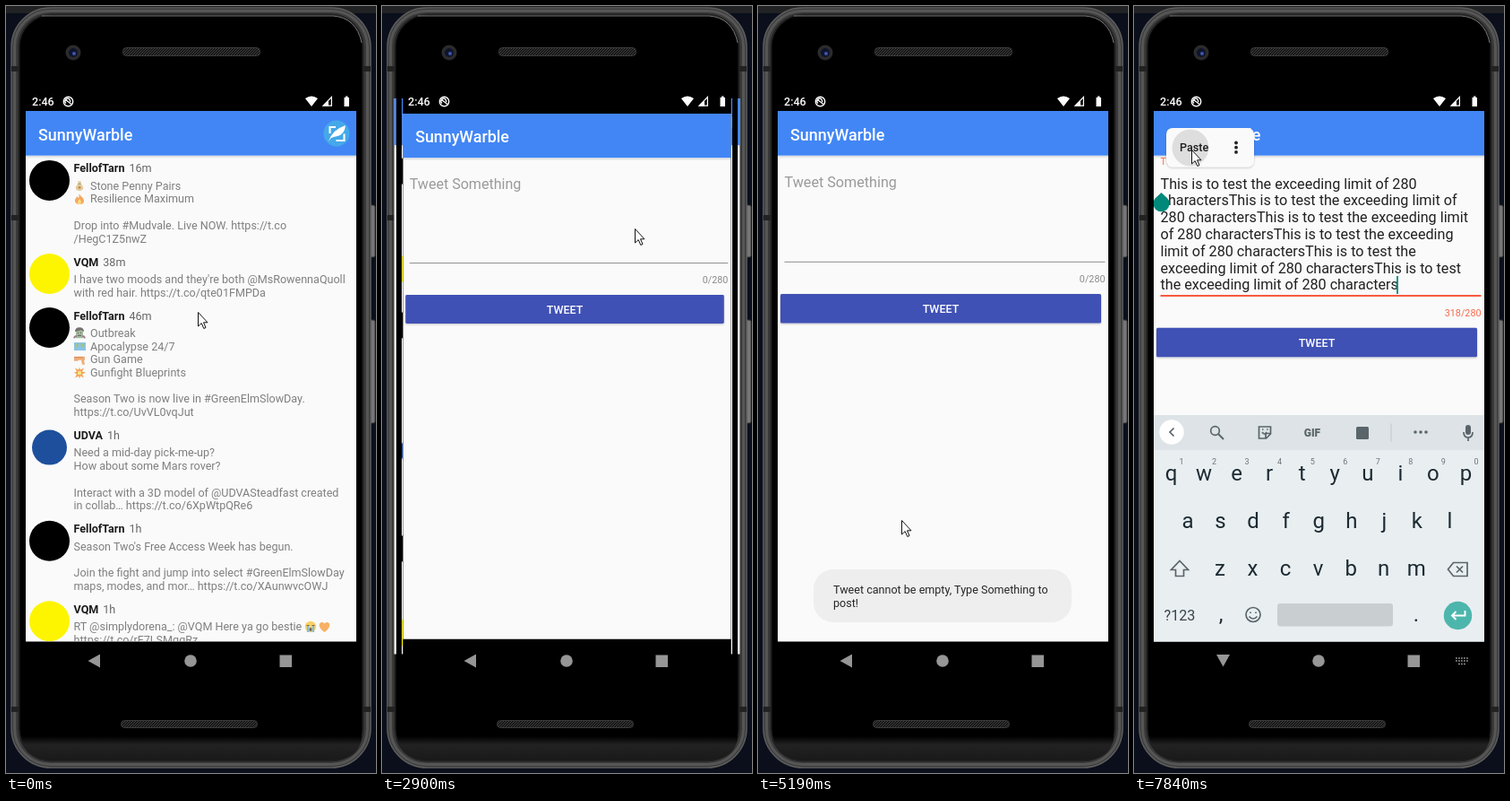
Write an HTML page that moves like this. It is 413 px wide and 855 px high and loops after 7.99 s.

```html
<!DOCTYPE html>
<html lang="en">
<head>
<meta charset="utf-8">
<title>Phone app demo</title>
<style>
  html, body { margin: 0; width: 100%; height: 100%; overflow: hidden; background: #0a0f1b; }
  svg { display: block; width: 100vw; height: 100vh; }
  text { font-family: Roboto, Arial, sans-serif; white-space: pre; }
  .title { font-size: 17.96px; font-weight: 500; fill: #fff; }
  .body { font-size: 12.57px; fill: #7f7f7f; }
  .name { font-size: 12.57px; font-weight: 700; fill: #1c1c1c; }
  .age { font-weight: 400; fill: #666; }
  .field { font-size: 16.16px; fill: #212121; }
  .count { font-size: 10.78px; text-anchor: end; }
  .caps { font-size: 12.57px; font-weight: 500; }
  .key { font-size: 24px; fill: #1c2b33; text-anchor: middle; }
  .num { font-size: 9px; fill: #6b757b; text-anchor: middle; }
  .mid { text-anchor: middle; }
  .ico { fill: none; stroke: #5a656b; stroke-width: 1.7; }
  #feed, #compose { transform-origin: 206.5px 413px; }
  #ripple { transform-origin: 168px 337px; }
  #press { transform-origin: 63px 158px; }
</style>
</head>
<body>
<svg viewBox="0 0 413 855" preserveAspectRatio="none">
  <defs>
    <linearGradient id="chin" x2="0" y2="1">
      <stop offset="0" stop-color="#000"/><stop offset=".35" stop-color="#222"/><stop offset="1" stop-color="#191919"/>
    </linearGradient>
    <linearGradient id="fall" x2="0" y2="1">
      <stop offset="0" stop-opacity=".14"/><stop offset="1" stop-opacity="0"/>
    </linearGradient>
    <pattern id="mesh" width="3" height="3" patternUnits="userSpaceOnUse">
      <rect width="3" height="3" fill="#161616"/><path d="M0 3L3 0" stroke="#4a4a4a" stroke-width=".8"/>
    </pattern>
    <filter id="soft" x="-10%" y="-20%" width="120%" height="150%">
      <feDropShadow dx="0" dy="1" stdDeviation="1" flood-opacity=".22"/>
    </filter>
    <clipPath id="page"><rect x="22" y="117" width="369" height="591.6"/></clipPath>

    <g id="bag"><path d="M4 1h4L7 4c5 3 4 8-1 8S0 7 5 4Z" fill="#e2c48f"/><path d="M4 4h4" stroke="#a57c48"/><circle cx="6" cy="8" r="1.5" fill="#a98042"/></g>
    <g id="fire"><path d="M6 0c0 3 5 4 5 8s-3 4-5 4-5-1-5-4 2-3 2-5l2 2C6 4 5 2 6 0Z" fill="#f49a45"/><path d="M6 6c2 2 3 6 0 6S4 8 6 6Z" fill="#fbd76c"/></g>
    <g id="ghoul"><path d="M2 12V3q4-5 8 0v9Z" fill="#93b08e"/><path d="M1 5q0-5 5-5t5 5L8 3 4 4Z" fill="#5f5a55"/><path d="M4 6h1M7 6h1M4 9h4" stroke="#444"/><path d="M0 12q1-3 3-2M12 12q-1-3-3-2" stroke="#8a6d7a" stroke-width="2" fill="none"/></g>
    <g id="map"><rect y="2" width="13" height="9" fill="#79b9e3"/><path d="M1 4l4-1-1 4-2 2ZM7 3l5 1-2 4-2-1Z" fill="#8dbb77"/></g>
    <g id="gun"><path d="M0 3h12v4H8l1 5h3L11 7H5L4 8H0Z" fill="#efa062"/><path d="M0 4h10" stroke="#c9774a"/></g>
    <g id="boom"><path d="M6 0l1 3 4-2-2 4 4 1-4 2 2 4-4-2-1 3-1-3-4 2 2-4-3-2 3-1-2-4 4 2Z" fill="#f2953e"/><circle cx="6" cy="6.5" r="2.2" fill="#fbdf70"/></g>
    <g id="sob"><circle cx="6.5" cy="6" r="6.2" fill="#fbc94e"/><path d="M3.5 5v7M9.5 5v7" stroke="#66b5ec" stroke-width="2.2"/><path d="M2 4.5h3M8 4.5h3" stroke="#664c20"/><ellipse cx="6.5" cy="9" rx="1.5" ry="2" fill="#664c20"/></g>
    <g id="heart"><path d="M6.5 12C-4 5 2-2 6.5 2.5 11-2 17 5 6.5 12Z" fill="#f6a54a"/></g>
  </defs>

  <!-- phone shell -->
  <rect width="413" height="855" fill="#0a0f1b"/>
  <rect width="413" height="8" fill="#212224"/>
  <g fill="#777" stroke="#333"><rect x="405" y="222" width="7" height="58" rx="2"/><rect x="405" y="350" width="7" height="115" rx="2"/></g>
  <rect x="6" y="2" width="401" height="847" rx="44" fill="#3a3a3a" stroke="#5c5c5c" stroke-width="1.5"/>
  <rect x="9.5" y="5.5" width="394" height="840" rx="40" fill="none" stroke="#565656" stroke-width="3"/>
  <rect x="14.5" y="9.500" width="384" height="832" rx="36" stroke="#222" stroke-width="2"/>
  <path d="M17 814H397q-2 27-34 27H52q-32 0-35-27Z" fill="url(#chin)"/>
  <path d="M40 11H365q26 2 32 30" fill="none" stroke="#777"/>
  <path d="M6 70h8M6 236h8M399 70h8M6 784h8M399 784h8" stroke="#222" stroke-width="6"/>
  <circle cx="75" cy="52" r="8.5" fill="#2b2b2d"/><circle cx="75" cy="52" r="5" fill="#10142a"/><circle cx="76" cy="53" r="2" fill="#3b55b5"/>
  <g fill="url(#mesh)" stroke="#3b3b3b"><rect x="130.5" y="46.5" width="153" height="9" rx="4"/><rect x="128.5" y="796.5" width="152" height="8" rx="4"/></g>

  <g id="feed">
    <g clip-path="url(#page)">
      <rect x="22" y="117" width="369" height="592" fill="#fafafa"/>
      <g id="posts"></g>
      <rect x="22" y="167" width="369" height="3" fill="url(#fall)"/>
      <rect x="22" y="117" width="369" height="49.700" fill="#4286f5"/>
      <text class="title" x="36" y="149.5">SunnyWarble</text>
      <circle cx="369" cy="142" r="14.5" fill="#45a8ea"/>
      <path d="M361.500 142v-7h6.500M377.500 142.500v7.500h-9" fill="none" stroke="#fff" stroke-width="2.1"/>
      <path d="M360 151q4-13 19-18-1 10-9 12-5 1-7 2Z" fill="#fff"/>
    </g>
  </g>
  <path d="M16 95h6v640h-6ZM391 95h6v640h-6Z"/>

  <g id="compose">
    <rect x="22" y="88" width="369" height="664"/>
    <g clip-path="url(#page)">
      <rect x="22" y="117" width="369" height="592" fill="#fafafa"/>
      <rect x="22" y="167" width="369" height="3" fill="url(#fall)"/>
      <rect x="22" y="117" width="369" height="49.700" fill="#4286f5"/>
      <text class="title" x="36" y="149.5">SunnyWarble</text>
      <text id="label" class="field">Tweet Something</text>
      <g id="typed"></g>
      <g id="lower">
        <path id="line" d="M29.5 285.3H387.5"/>
        <text id="zero" class="count" x="387.5" y="308" fill="#8a8a8a">0/280</text>
        <text id="over" class="count" x="387.5" y="308" fill="#f8694a">318/280</text>
        <rect x="25" y="321" width="358" height="32.5" rx="1.5" fill="#3f51b5" filter="url(#soft)"/>
        <rect id="ripple" x="39" y="321" width="323" height="32.5" rx="2" fill="#3a439b"/>
        <text class="caps mid" x="204" y="342.2" fill="#fff">TWEET</text>
      </g>
      <path id="caret" d="M30.3 186V208" stroke="#00897b" stroke-width="1.8"/>
      <path id="caretEnd" d="M294 301V321" stroke="#00897b" stroke-width="1.8"/>
      <path id="grip" d="M30.5 208L37 214a9 9 0 1 1-13 0Z" fill="#00897b"/>
      <g id="popup">
        <rect x="36" y="136" width="98" height="43.5" rx="7" fill="#fafafa" filter="url(#soft)"/>
        <circle id="press" cx="63" cy="158" r="20.5" fill="#dedede"/>
        <text class="caps" x="51" y="162" fill="#1c1c1c">Paste</text>
        <g fill="#222"><circle cx="114" cy="152.5" r="1.9"/><circle cx="114" cy="157.7" r="1.9"/><circle cx="114" cy="162.9" r="1.9"/></g>
      </g>
      <g id="keyboard">
        <rect x="22" y="456" width="369" height="253" fill="#e9eef1"/>
        <rect x="22" y="456" width="369" height="39" fill="#dde3e6"/>
        <circle cx="42" cy="475" r="13.7" fill="#fff"/>
        <g class="ico">
          <path d="M44.5 470.5L40 475l4.5 4.5"/>
          <circle cx="90.5" cy="473.5" r="4.8"/><path d="M94 477l6 6" stroke-width="2"/>
          <path d="M139.5 469h13v8l-5 5h-8ZM152 476.5h-5v5M143 475q3 4 5 0M143 472h1.5M148 472h1.5"/>
          <path d="M287 465.5v20" stroke="#c3c9cc" stroke-width="1"/>
          <path d="M368 475q0 6 5 6t5-6M373 481v4"/>
          <path d="M51 618.5l9.5 10h-5v7h-9v-7h-5Z"/>
          <path d="M356.5 620.5H372v15h-15.5l-6-7.5ZM360 624.5l7 7m0-7l-7 7"/>
          <circle cx="133" cy="678.5" r="8"/><path d="M128.5 680.5q4.5 5 9 0M130 675.5v1.5M136 675.5v1.5"/>
        </g>
        <g fill="#5a656b"><rect x="248" y="469" width="14" height="14" rx="1.5"/><rect x="370" y="467" width="6" height="11" rx="3"/>
          <circle cx="314" cy="475" r="1.8"/><circle cx="320" cy="475" r="1.8"/><circle cx="326" cy="475" r="1.8"/></g>
        <text x="199" y="479.5" class="mid" font-size="12" font-weight="900" fill="#5a656b">GIF</text>
        <g id="keys"></g>
        <text x="51" y="684.5" class="mid" font-size="16.2" fill="#37444b">?123</text>
        <rect x="160" y="666" width="129" height="25.5" rx="3" fill="#c9ced1"/>
        <circle cx="361.5" cy="679.5" r="15.7" fill="#4db6ac"/>
        <path d="M369.5 674v5.5H355m4.5-4.5l-4.5 4.5 4.5 4.5" fill="none" stroke="#fff" stroke-width="1.9"/>
      </g>
      <g id="toast">
        <rect x="62" y="628" width="288" height="59" rx="22" fill="#eee"/>
        <g class="body" style="fill:#262626"><text x="84" y="655.3">Tweet cannot be empty, Type Something to</text><text x="84" y="670.2">post!</text></g>
      </g>
    </g>
  </g>

  <!-- status and navigation bars -->
  <g fill="#fff">
    <text class="caps" x="29" y="111.3">2:46</text>
    <path d="M334 103q7-5 14 0l-7 9ZM377.5 102h1.5v-1.5h2.5V102h1.500v10h-5.500Z"/>
    <path d="M354 111.2L363.4 101.5V111.2Z" fill="none" stroke="#fff" stroke-width="1.2"/><path d="M354 111.5l6-6v6Z"/>
  </g>
  <circle cx="69.5" cy="106.5" r="5.2" fill="none" stroke="#fff" stroke-width="1.4"/>
  <path d="M66 104l7 5.5M67 108.5a3 3 0 0 1 4-4.5l1 3" fill="none" stroke="#fff" stroke-width="1.3"/>
  <g fill="#969696">
    <path id="back" d="M91.5 730L105 722.5v15Z"/>
    <path id="down" d="M92 723h15L99.5 736.5Z"/>
    <circle cx="206" cy="730" r="6.8"/><rect x="305.5" y="723.5" width="13.5" height="13.5"/>
    <path id="board" d="M359 727h14M359 730h14M362 733.5h8" fill="none" stroke="#969696" stroke-width="1.7" stroke-dasharray="1.8 1.2"/>
  </g>
  <path id="cursor" d="M.5.5V16L4.2 12.6 6.8 18.5 9 17.5 6.500 11.800H11Z" fill="#fff" stroke="#111"/>
</svg>

<script>
const LOOP = 7990;
const $ = id => document.getElementById(id);

function add(parent, tag, attrs, text) {
  const el = document.createElementNS('http://www.w3.org/2000/svg', tag);
  for (const k in attrs) el.setAttribute(k, attrs[k]);
  if (text) el.textContent = text;
  $(parent)?.append(el);
  return el;
}

// [name, age, avatar colour, avatar radius, lines]; a line may open with ~emoji
const posts = [
  ['FellofTarn', '16m', '#000', 22.5, '~bag Stone Penny Pairs|~fire Resilience Maximum||Drop into #Mudvale. Live NOW. https://t.co|/HegC1Z5nwZ'],
  ['VQM', '38m', '#fdf500', 22.5, "I have two moods and they're both @MsRowennaQuoll|with red hair. https://t.co/qte01FMPDa"],
  ['FellofTarn', '46m', '#000', 22.5, '~ghoul Outbreak|~map Apocalypse 24/7|~gun Gun Game|~boom Gunfight Blueprints||Season Two is now live in #GreenElmSlowDay.|https://t.co/UvVL0vqJut'],
  ['UDVA', '1h', '#1d4f9c', 19.5, 'Need a mid-day pick-me-up?|How about some Mars rover?||Interact with a 3D model of @UDVASteadfast created|in collab… https://t.co/6XpWtpQRe6'],
  ['FellofTarn', '1h', '#000', 22.5, "Season Two's Free Access Week has begun.||Join the fight and jump into select #GreenElmSlowDay|maps, modes, and mor… https://t.co/XAunwvcOWJ"],
  ['VQM', '1h', '#fdf500', 22.5, 'RT @simplydorena_: @VQM Here ya go bestie |https://t.co/rF7LSMqqRz']
];
let y = 185.4;
for (const [name, age, fill, r, copy] of posts) {
  add('posts', 'circle', { cx: 48.5, cy: y + 9, r, fill });
  const head = add('posts', 'text', { x: 75.5, y, class: 'name' }, name);
  head.append(add('', 'tspan', { dx: 5, class: 'age' }, age));
  const lines = copy.split('|');
  lines.forEach((line, i) => {
    const by = y + 19.3 + i * 14.73;
    const [, emoji, rest] = line.match(/^(?:~(\w+) )?(.*)$/);
    if (emoji) add('posts', 'use', { href: '#' + emoji, x: 76, y: by - 10.5, opacity: .85 });
    add('posts', 'text', { x: emoji ? 94 : 75.5, y: by, class: 'body' }, rest);
  });
  y += 30.5 + 14.73 * lines.length;
}
add('posts', 'use', { href: '#sob', x: 333.5, y: 686, opacity: .85 });
add('posts', 'use', { href: '#heart', x: 349, y: 686, opacity: .85 });

['This is to test the exceeding limit of 280',
 'charactersThis is to test the exceeding limit of',
 '280 charactersThis is to test the exceeding limit',
 'of 280 charactersThis is to test the exceeding',
 'limit of 280 charactersThis is to test the',
 'exceeding limit of 280 charactersThis is to test',
 'the exceeding limit of 280 characters'
].forEach((s, i) => add('typed', 'text', { x: 29.5, y: 203.5 + i * 18.8, class: 'field' }, s));

[['qwertyuiop', 41.5, 529], ['asdfghjkl', 60, 581.5], ['zxcvbnm', 96, 635]].forEach(([row, x, ky]) =>
  [...row].forEach((c, i) => {
    add('keys', 'text', { x: x + i * 36.55, y: ky, class: 'key' }, c);
    if (ky < 550) add('keys', 'text', { x: 53 + i * 36.55, y: 511, class: 'num' }, String((i + 1) % 10));
  }));
add('keys', 'text', { x: 97, y: 686, class: 'key' }, ',');
add('keys', 'text', { x: 315, y: 686, class: 'key' }, '.');

// Each track holds a value until its next listed time.
const tracks = [];
const hold = (id, prop, steps) => tracks.push({ style: $(id).style, prop, steps });
const fade = (id, ...steps) => hold(id, 'opacity', [[0, 0], ...steps]);
const at = (x, y, s = 1) => `translate(${x}px, ${y}px) scale(${s})`;

hold('cursor', 'transform', [
  [0, 214, 341], [530, 243, 250], [650, 205, 150], [780, 120, 105], [900, 42, 112], [1020, 50, 175],
  [1140, 116, 198], [1290, 193, 198], [1440, 250, 228], [1560, 310, 205], [1690, 345, 160],
  [1810, 359, 150], [1950, 378, 150], [2090, 382, 146], [2220, 374, 140], [2340, 370, 139],
  [2780, 330, 185], [2900, 282, 248], [3020, 245, 300], [3170, 222, 325], [3290, 208, 330],
  [3410, 200, 325], [3530, 198, 322], [3680, 195, 335], [3810, 194, 344], [3950, 194, 346],
  [4440, 200, 400], [4560, 207, 480], [4680, 211, 560], [4800, 213, 640], [4920, 210, 688],
  [5060, 112, 640], [5190, 160, 573], [5340, 150, 360], [5460, 138, 160], [5580, 128, 88],
  [5700, 128, 170], [5820, 130, 206], [6230, 110, 212], [6350, 70, 214], [6470, 42, 214],
  [6590, 32, 212], [7360, 44, 196], [7480, 58, 172], [7600, 64, 160]
].map(([t, x, y]) => [t, at(x, y)]));

hold('feed', 'transform', [[0, 'none'], [2780, 'scale(1.025)'], [2900, 'scale(1.047)'], [3020, 'none']]);
hold('compose', 'transform', [[0, 'scale(.95)'], [2900, 'scale(.993, .99)'], [3020, 'none']]);
fade('compose', [2780, .8], [2900, 1]);

fade('ripple', [4200, 1], [4440, .5], [4560, 0]);
hold('ripple', 'transform', [[0, 'none'], [4320, 'scaleX(1.1084)']]);
fade('toast', [4320, .3], [4440, .75], [4560, 1], [6110, .93], [6230, .4], [6350, 0]);

hold('label', 'transform', [[0, at(29.5, 201.5)], [5820, at(29.5, 193, .86)], [5970, at(29.5, 180, .71)], [6110, at(29.5, 177, .667)]]);
hold('label', 'fill', [[0, '#9a9a9a'], [5820, '#00897b'], [7840, '#f8694a']]);
hold('line', 'stroke', [[0, '#8c8c8c'], [5820, '#00897b'], [7840, '#f85a40']]);
hold('line', 'strokeWidth', [[0, '1px'], [5820, '1.8px']]);
fade('caret', [5820, 1], [6470, 0], [6840, 1], [7360, 0]);

fade('keyboard', [5970, 1]);
hold('keyboard', 'transform', [[0, at(0, 110)], [6110, 'none']]);
hold('back', 'opacity', [[0, 1], [5970, 0]]);
fade('down', [5970, 1]);
fade('board', [5970, 1]);

fade('grip', [6840, 1]);
fade('popup', [7240, .6], [7360, 1]);
fade('press', [7720, 1]);
hold('press', 'transform', [[0, 'scale(.6)'], [7840, 'none']]);
fade('typed', [7840, 1]);
fade('caretEnd', [7840, 1]);
fade('over', [7840, 1]);
hold('zero', 'opacity', [[0, 1], [7840, 0]]);
hold('lower', 'transform', [[0, 'none'], [7840, at(0, 37.7)]]);

let start;
function draw(now) {
  start ??= now;
  const t = (now - start) % LOOP;
  for (const { style, prop, steps } of tracks)
    style[prop] = steps.findLast(([from]) => from <= t)[1];
  requestAnimationFrame(draw);
}
requestAnimationFrame(draw);
</script>
</body>
</html>
```
